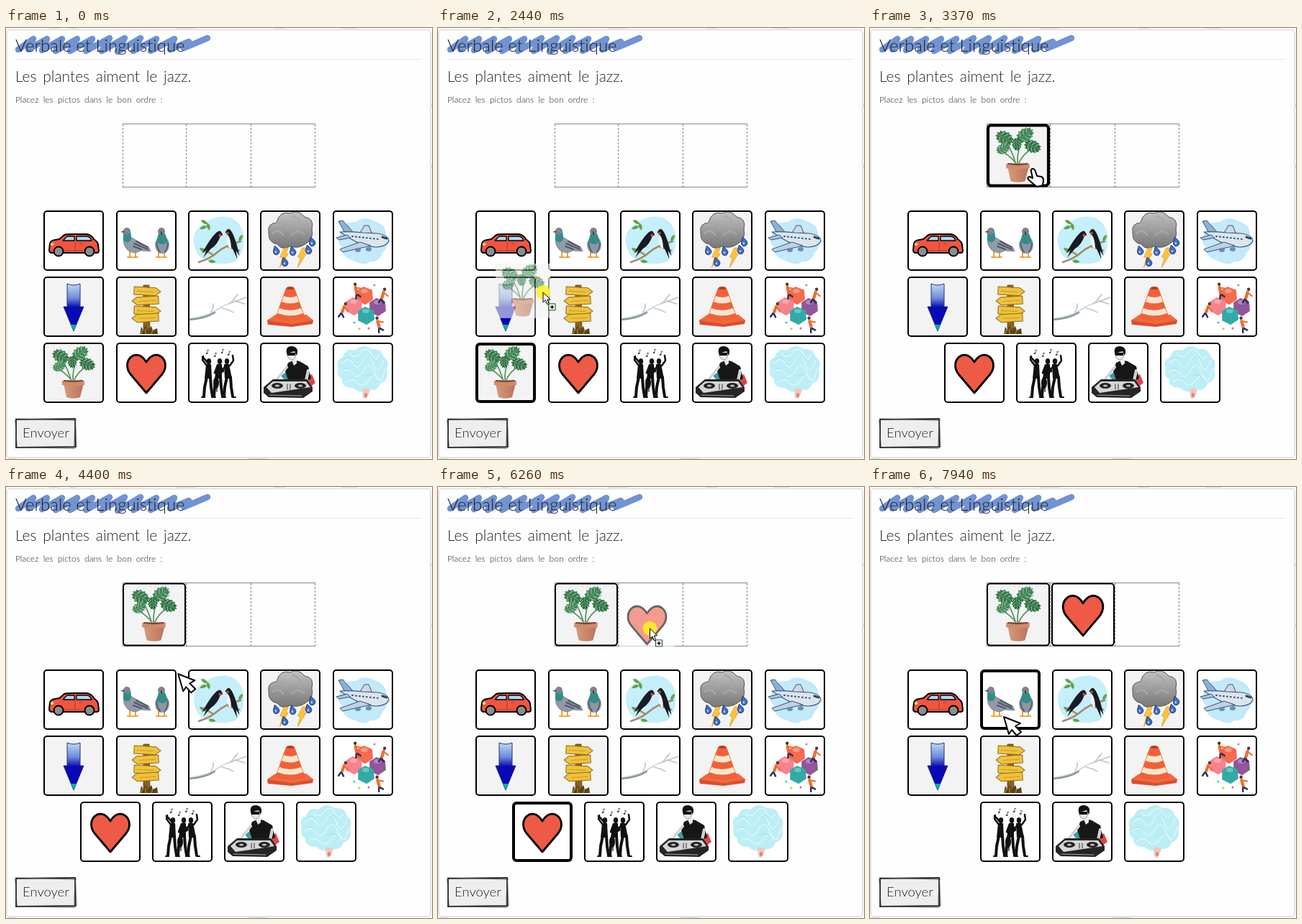
An HTML page for the animation above (8000 ms loop, 592 px wide and 600 px high).

```html
<!DOCTYPE html>
<html lang="fr">
<head>
<meta charset="utf-8">
<title>Pictos</title>
<style>
html, body { margin: 0; width: 100%; height: 100%; overflow: hidden; background: #fff; }
svg { display: block; width: 592px; height: 600px; }
text { font-family: "Architects Daughter", Lato, "Open Sans", sans-serif; font-weight: 300; font-variant-ligatures: none; fill: #222; }
</style>
</head>
<body>
<svg id="stage" viewBox="0 0 592 600" xmlns="http://www.w3.org/2000/svg">
  <defs>
    <linearGradient id="shaft" x1="0" y1="0" x2="0" y2="1"><stop offset="0" stop-color="#c4d8f4"/><stop offset=".3" stop-color="#6c8ed6"/><stop offset=".5" stop-color="#0808b4"/></linearGradient>
    <linearGradient id="cloud" x1="0" y1="0" x2="0" y2="1"><stop offset="0" stop-color="#c2c2c2"/><stop offset="1" stop-color="#777"/></linearGradient>
    <linearGradient id="pot" x1="0" x2="1"><stop offset="0" stop-color="#d99a7a"/><stop offset="1" stop-color="#b8745a"/></linearGradient>
  </defs>
  <path d="M60 .5h14M88 .5h10M236 .5h28M372 .5h16M466 .5h22M2 599.5h12M338 599.5h24M591.5 106v5M591.5 190v5" stroke="#ddd" fill="none"/>
  <rect x="1" y="2.5" width="589" height="595.5" rx="4" fill="#fefefe" stroke="#dcdcdc" stroke-width="1.5"/>
  <path d="M13 43.5H578" stroke="#e8e8e8"/>
  <path d="M17 30L38 15 31 30 57 15 50 31 78 15 69 32 99 15 89 32 120 15 111 32 144 14 133 32 165 14 155 33 187 14 177 32 209 15 201 32 234 15 228 30 254 19 247 28 280 14" fill="none" stroke="#7093d3" stroke-width="8.5" stroke-linecap="round" stroke-linejoin="round"/>
  <text x="13" y="33" font-size="24">Verbale et Linguistique</text>
  <text x="13" y="75" font-size="21" word-spacing="3">Les plantes aiment le jazz.</text>
  <text x="13" y="104" font-size="12" word-spacing="3">Placez les pictos dans le bon ordre :</text>
  <path d="M162 133.5H430M162 221.5H430" stroke="#888" stroke-width="1.2"/>
  <path d="M162.5 134V221M250.5 134V221M340.5 134V221M429.5 134V221" stroke="#888" stroke-dasharray="3 2"/>
  <path d="M14 545L96 544 97 583 14 584Z" fill="#eee" stroke="#333" stroke-width="2"/>
  <path d="M13 544L98 546M15 584L96 585M96 545L95 584M13 546L15 583" stroke="#444" stroke-width="1.2"/>
  <text x="23" y="569.5" font-size="18.5">Envoyer</text>
  <g id="cards"></g>
  <g id="ghost" opacity=".6"></g>
  <circle id="halo" r="10" fill="#fff21f" opacity=".85"/>
  <g id="pointer" stroke="#000" fill="#fff" stroke-width="2" stroke-linejoin="round">
    <path id="pointer-arrow" d="M0 0L23 9 16 13 24 21 18 26 11 18 7 24Z"/>
    <path id="pointer-hand" d="M-3 3Q-4 -1 -1 -1 2 -1 3 3L5 9 11 10Q14 11 14 15L13 22 5 24 0 20 -7 14Q-9 10 -5 10L-1 12Z"/>
    <g id="pointer-carry" stroke-width="1"><path d="M0 0V14L3.500 11 6 17 8 16 6 10 10 10Z"/><path d="M3 14l8 6" stroke-dasharray="1 1"/><path d="M8 16h9v9h-9z" stroke="#174d17"/><path d="M12.500 18v5M10 20.500h5" stroke-width="1.500"/></g>
  </g>
</svg>
<script>
const $ = id => document.getElementById(id);
const path = (d, fill, more = '') => `<path d="${d}" fill="${fill}" ${more}/>`;
const line = (d, color, w = 1) => path(d, 'none', `stroke="${color}" stroke-width="${w}" stroke-linecap="round" stroke-linejoin="round"`);
const oval = (x, y, rx, ry, fill, more = '') => `<ellipse cx="${x}" cy="${y}" rx="${rx}" ry="${ry}" fill="${fill}" ${more}/>`;
const at = (x, y, body, turn = 0, scale = 1) => `<g transform="translate(${x} ${y}) rotate(${turn}) scale(${scale})">${body}</g>`;
const each = (list, draw) => list.map(p => draw(...p)).join('');
const ink = (w = 1, c = '#000') => `stroke="${c}" stroke-width="${w}" stroke-linejoin="round"`;

function leaf(x, y, size, turn, color) {
  let d = '';
  for (let i = 0; i < 26; i++) {
    const a = i / 26 * 2 * Math.PI, r = size * (i % 2 ? .8 : 1);
    d += `${i ? 'L' : 'M'}${(r * Math.cos(a)).toFixed(1)} ${(r * .74 * Math.sin(a)).toFixed(1)}`;
  }
  const slits = [-.5, -.1, .3].map(k => {
    const sx = k * size, sy = size * .55;
    return `M${sx} 2L${sx + 3} ${sy}M${sx} -2L${sx + 3} ${-sy}`;
  }).join('');
  return at(x, y, path(d + 'Z', color) + line(slits, '#b9d3be', .9) + line(`M${-size * .8} 0H${size * .8}`, '#6fae78', .8), turn);
}

const pigeonFeet = x => line(`M${x} 15v7m-3 1h6`, '#f2a02c', 2);
const swallow = path('M-4-15Q-1-21 4-17L7-15 4-13Q7 0 0 10L-4 25-5 13-9 21Q-9-5-4-15Z', '#161b26') + oval(3, -13, 2.5, 2, '#d8402f');
const drop = (x, y) => at(x, y, path('M0-7Q6 1 5 4 3 8 0 8-4 8-5 4-5 0 0-7Z', '#416fc4', ink(1, '#17336f')) + oval(-1, 3, 1.500, 2, '#a8caf5'), -15, .85);
const bolt = (x, y) => at(x, y, path('M2-13L8-13 4-4 8-4-5 17-1 1-5 1Z', '#fbc53a', ink(.8, '#e98b1d')), 0, .9);
const sign = (y, dir) => at(0, y, path('M-17-5H13L20 0 13 6H-17Z', '#f0c23a', ink(1, '#8d6b1d')) + line('M-13 1H10', '#c99a28'), dir * 3, `${dir} 1`);
const worker = (x, y, turn) => at(x, y,
  line('M0-2L-2 6-5 13M-2 6L3 12', '#283453', 3) + line('M0-5L-1 4', '#f36b2d', 5) + line('M1-4L8 0', '#f36b2d', 2.5) + oval(1, -10, 2.600, 2.600, '#50342e'), turn, .85);
const block = (x, y, c) => at(x, y, path('M-9-5L-1-10 9-6 10 5 1 11-9 6Z', c) + oval(0, -5, 4, 2.500, '#fff', 'opacity=".3"'), 0, 1.2);
const player = (x, lean, arms) => at(x, 0,
  oval(lean, -16, 3.200, 4, '#111') + path(`M${lean - 4}-12L${lean + 3}-12 5 8-5 8Z`, '#111')
  + line('M-2 6L-5 20-6 33M3 6L4 20 6 33', '#111', 4) + line('M-9 34h4M6 34h4', '#111', 2) + line(arms, '#111', 2.5));

const art = {
  car: path('M-34 13L-33 4Q-32 0-26-1L-20-2-13-8Q-10-9 0-9H18Q25-8 28-2 34 2 34 6L35 14Q35 17 32 17H-30Q-34 17-34 13Z', '#f05540', ink(2))
    + path('M-15 0L-9-6H1V0ZM4-6H18Q23-6 25 0H4Z', '#a3ddf5', ink(1.300))
    + line('M2 1V13M-12 14H13M8 4h4', '#a93a2c') + oval(-30, 5, 2.500, 2, '#ffd35a')
    + each([[-21], [22]], x => oval(x, 15, 6.500, 6.500, '#8d8d8d', ink(2))),
  pigeons: pigeonFeet(-23) + pigeonFeet(-15) + pigeonFeet(17) + pigeonFeet(25)
    + path('M-31-8Q-24-8-20-4L4 10 6 15-8 14Q-17 20-26 13-34 6-31-8Z', '#939aa8', ink(.6, '#646b78'))
    + path('M-32-12H-22Q-20-5-22 0-28 5-32-1Z', '#318d88') + oval(-27, -13, 5, 5, '#788395') + path('M-31-14l-5 2 5 1Z', '#444')
    + line('M-17 4L2 12M-14 1L2 9M-18 8L-7 12', '#505867', 2)
    + oval(22, 6, 10, 12, '#8f96a5') + path('M17-10H26L30 1Q22 9 14 1Z', '#318d88') + oval(21, -13, 5, 5, '#788395') + line('M21-12v3', '#444', 2) + line('M14 3Q16 13 19 16M30 3Q29 12 26 16', '#596273', 2)
    + each([[-28], [19], [23]], x => oval(x, -14, .9, .9, '#e67833')),
  swallows: path('M-34 3Q-36-15-18-25 0-38 19-31 36-22 35-2 37 14 24 29 5 36-12 29-31 25-34 3Z', '#c4effb')
    + line('M-27 30Q-11 25-1 16T31 1M-7 20L-20 12M14 9L29 14', '#a58a68', 2.5)
    + each([[-20, -26, 30], [-21, -18, -20], [-14, -20, 75], [-22, 13, 35], [-9, 29, 10], [31, -3, -60]], (x, y, r) => at(x, y, path('M-5 0Q0-5 6 0 0 4-5 0Z', '#63a342'), r))
    + at(-6, 3, swallow, 28, '.85 1') + at(18, 2, swallow + oval(4, -1, 3, 10, '#f4f4f4'), -12, '-.8 1'),
  storm: path('M-30-12Q-32-24-19-25-15-42 0-38 11-44 20-33 34-31 30-16 33-2 22 4 12 12 0 8-12 14-18 5-31 3-30-12Z', 'url(#cloud)', ink(1, '#555'))
    + line('M-19-24Q-7-27-5-17M3-34Q16-31 13-20M-24-11Q-16-17-10-8M2-8Q10-17 19-9', '#a7a7a7', 2.5)
    + bolt(-10, 22) + bolt(15, 22) + each([[-20, 13], [3, 14], [25, 12], [-8, 29], [30, 1]], drop),
  plane: path('M-30 8Q-39-1-29-13-27-27-10-26 2-35 16-27 33-22 32-7 38 8 27 17 24 30 10 29 2 36-10 29-29 25-30 8Z', '#c3e9fa')
    + path('M-4-11L2-21 8-21 13-9Z', '#cad9e7', ink(1, '#385572'))
    + path('M-25-11L-34-27-28-28-13-11Z', '#85b3df', ink(1, '#385572'))
    + path('M-32-12Q-20-13 0-11L20-10Q35-8 36 0 34 8 18 9 0 8-16-2Z', '#dce5ee', ink(1.200, '#405973'))
    + path('M-4 2L-32 12-28 16 11 7Z', '#bdd2e6', ink(1, '#385572')) + path('M-22-8L-37-4-33-1-17-4Z', '#a9c6e3', ink(1, '#385572'))
    + line('M-15-6L22-2', '#335779', 2).replace('/>', ' stroke-dasharray="1 4"/>') + line('M27-5l6 2', '#2b4a69', 3) + oval(-7, 13, 4, 3, '#6c8dac') + oval(8, 12, 4, 3, '#6c8dac'),
  arrow: path('M-9-32Q0-28 9-32V0H14L0 34-14 0H-9Z', 'url(#shaft)', ink(1, '#223183')) + path('M-4 25H4L0 34Z', '#18a4a7'),
  sign: path('M-4-30H4L5 32H-4Z', '#8b6228', ink(.7, '#4f3516')) + sign(-22, 1) + sign(-9, -1) + sign(5, 1) + sign(15, -1)
    + path('M-9 38L-7 28-4 33-1 26 2 33 7 27 9 33 15 30 16 38Z', '#5f4218') + line('M-8 38l3-6M-1 38v-7M7 38l2-6', '#c0a153'),
  branch: line('M-39 17Q-17 14-5 6T17-5L39-13M-11 9Q-6 1-7-4M5 2Q15 4 21 8M17-5L27-17M23-8L37-4', '#b9c3c7', 1.5)
    + line('M-39 18Q-17 16-5 8', '#8c979b', 2.5) + line('M-37 15Q-14 12-3 4L18-7', '#e3eaed', 1),
  cone: path('M-32 19L-20 11 22 11 32 19 31 24 2 28-31 25Z', '#db4e2c') + path('M-32 19L-20 11H22L32 19 2 24Z', '#f2693d')
    + path('M-6-26Q0-29 6-26L21 16Q0 23-21 16Z', '#ef6239') + path('M-9-15Q0-11 9-15L12-7Q0-2-12-7ZM-15 2Q0 8 15 2L18 9Q0 16-18 9Z', '#fae5d0') + oval(0, -26, 5, 2, '#a94127'),
  team: block(2, -16, '#f36b50') + block(-13, -1, '#f5838f') + block(20, 0, '#92549d') + block(4, 12, '#32aaa7')
    + worker(-27, 4, 14) + worker(-9, -23, -18) + worker(28, -16, 9) + worker(22, 24, -22)
    + each([[-12, 22, '#48b9dc'], [-5, 31, '#f6b53c'], [8, 30, '#e36193'], [16, -30, '#5eb1dd']], (x, y, c) => oval(x, y, 1.600, 1.600, c)),
  plant: line('M-3 12Q-8-6-17-20M-1 12Q-2-9 8-27M0 12Q5-1 18-9M-2 12Q-8 3-19-4', '#5a9463', 1.700)
    + leaf(-18, -23, 13, 28, '#34794a') + leaf(9, -27, 13, -35, '#3f8554') + leaf(19, -12, 12, 22, '#2e7046') + leaf(-20, -9, 10, -25, '#43895a') + leaf(-2, -15, 9, 85, '#2c6b42')
    + path('M-14 15H14L9 34Q0 37-10 34Z', 'url(#pot)') + path('M-16 11Q0 9 15 11V17Q0 19-16 17Z', '#d08b6c') + line('M-13 11Q0 13 12 11', '#6b4939', 2),
  heart: path('M0 28L-22 2C-36-16-14-38 0-15 14-38 36-16 22 2Z', '#ee5a46', ink(2.800)),
  band: player(-14, 1, 'M-2-10L-8-18-7-23M3-9L-4-18-8-22') + player(0, 2, 'M-2-8L-5 0 3 3M4-8L7-2') + player(14, -2, 'M-5-9L-9-1M2-10L7-17 6-24')
    + oval(-3, 14, 4, 8, '#111') + line('M-2 26V-10', '#111', 1.300) + line('M12-13Q8-4 12 2L16-2', '#111', 2)
    + each([[-15, -31], [-4, -27], [6, -32], [15, -29]], (x, y) => line(`M${x} ${y + 4}v-5l2 1`, '#333', .8) + oval(x - 1, y + 4, 1.300, 1, '#333')),
  dj: path('M18 9L30 2 35 14 27 20Z', '#dd4650') + path('M-13 4L-6-1 0 8-7 11Z', '#3c9e9d')
    + path('M-3-14Q5-19 13-16L25-9 29 8 18 13H-2L-7-2Z', '#171717') + line('M-5-8L-13 2-21 12M25-3L22 11 12 16', '#e6e6e6', 4) + line('M-5-8L-13 2-21 12M25-3L22 11 12 16', '#999', .7)
    + path('M1-20L9-20 9-13 5-10Z', '#eee') + oval(2, -26, 6, 8, '#e9e9e9', ink(.6, '#666')) + path('M-5-27Q-7-38 3-37 13-35 9-24L6-30Z', '#111') + path('M-5-28H7V-24H-4Z', '#111')
    + path('M-37 20L-24 9H23L31 20V26L18 35-30 34-37 28Z', '#252525') + path('M-33 20L-24 12H22L28 20-26 28Z', '#d6d6d6')
    + each([[-18], [14]], x => oval(x, 18, 8, 4, '#222') + oval(x, 18, 3, 1.500, '#bbb')) + line('M-29 31L16 32', '#aaa') + line('M-4 16v7M0 16v7', '#333'),
  brain: path('M-34-6Q-39-17-28-22-24-35-11-31 0-42 11-33 25-35 29-22 38-15 33-5 37 10 24 15 20 27 7 23-2 31-14 21-30 21-29 9-37 5-34-6Z', '#bdeef6')
    + line('M-29-13Q-20-24-14-13T0-17 14-13 29-18M-31 0Q-21-9-14 1T1-4 17 2 31-5M-24 13Q-15 6-8 14T8 10 23 11M-18-27Q-11-18-3-28T12-26 22-24', '#dcf8fc', 1.300)
    + line('M-27-18Q-21-26-15-17M-28-4Q-22-11-17-3M4-20Q10-27 16-18M4 5Q11-1 16 7', '#93d9e5', .7)
    + path('M-1 23Q4 19 10 24L6 34Q3 38 0 34Z', '#f0c8bd') + oval(4, 31, 2, 3, '#df856f')
};

const GAP = 100.3, SIZE = 84;
const names = Object.keys(art);
const grey = ['storm', 'arrow', 'sign', 'cone', 'plant'];
const shade = name => grey.includes(name) ? '#f3f3f3' : '#fff';
$('cards').innerHTML = names.map(n =>
  `<g id="card-${n}"><rect rx="4" stroke="#000" fill="${shade(n)}"/>${art[n]}</g>`).join('');

const drags = [
  { name: 'plant', from: 1970, to: 3160, slot: 206, grab: [28, 2] },
  { name: 'heart', from: 5650, to: 6390, slot: 296, grab: [4, 6] }
];
const route = [
  [780, 270, 615], [1270, 186, 551], [1800, 122, 484], [2100, 122, 482], [2440, 146, 368],
  [3000, 222, 205], [3370, 227, 197], [4140, 230, 200], [4700, 250, 330], [5450, 195, 480],
  [5580, 149, 486], [5720, 149, 486], [6300, 300, 186], [6500, 300, 190], [6880, 190, 405],
  [7020, 163, 434], [7250, 165, 450], [7930, 186, 320]
];

function pointerAt(t) {
  const i = route.findIndex(k => k[0] > t);
  if (i < 1) return (i ? route[route.length - 1] : route[0]).slice(1);
  const a = route[i - 1], b = route[i], u = (t - a[0]) / (b[0] - a[0]), e = u * u * (3 - 2 * u);
  return [a[1] + (b[1] - a[1]) * e, a[2] + (b[2] - a[2]) * e];
}

function layout(t) {
  const placed = drags.filter(d => t >= d.to);
  const last = names.slice(10).filter(n => !placed.some(d => d.name === n));
  const spots = {};
  [names.slice(0, 5), names.slice(5, 10), last].forEach((row, r) => row.forEach((n, i) => {
    spots[n] = { x: Math.round(295 + (i - (row.length - 1) / 2) * GAP), y: 296 + 92 * r, s: 1 };
  }));
  placed.forEach(d => { spots[d.name] = { x: d.slot, y: 177.5, s: 1.05 }; });
  return spots;
}

function hovered(t) {
  const [x, y] = pointerAt(t), spots = layout(t);
  return names.find(n => Math.max(Math.abs(x - spots[n].x), Math.abs(y + 8 - spots[n].y)) < 43 * spots[n].s);
}

const show = (id, on) => $(id).setAttribute('display', on ? 'inline' : 'none');
const move = (id, x, y, s = 1) => $(id).setAttribute('transform', `translate(${x} ${y}) scale(${s})`);

function render(ms) {
  const t = Math.floor((ms - 80) / 130.5) * 130.5 + 100;
  const [x, y] = pointerAt(t), spots = layout(t);
  const drag = drags.find(d => t >= d.from && t < d.to);
  const hot = drag ? drag.name : hovered(t);
  for (const n of names) {
    const { x: cx, y: cy, s } = spots[n], w = n === hot ? 4 : 2, side = SIZE - w;
    move(`card-${n}`, cx, cy, s);
    const rect = $(`card-${n}`).firstChild;
    Object.entries({ x: -side / 2, y: -side / 2, width: side, height: side, 'stroke-width': w })
      .forEach(([k, v]) => rect.setAttribute(k, v));
  }
  show('ghost', drag);
  show('halo', drag);
  if (drag) {
    if ($('ghost').dataset.name !== drag.name) {
      $('ghost').dataset.name = drag.name;
      $('ghost').innerHTML = `<rect x="-38" y="-38" width="76" height="76" fill="${shade(drag.name)}"/>${art[drag.name]}`;
    }
    move('ghost', x - drag.grab[0], y - drag.grab[1]);
    move('halo', x, y);
  }
  // The cursor shape lags one step behind the hover outline.
  const hand = !drag && hovered(t - 130.5);
  show('pointer-arrow', !drag && !hand);
  show('pointer-hand', hand);
  show('pointer-carry', drag);
  move('pointer', x, y);
}

const start = performance.now();
function tick() {
  render((performance.now() - start) % 8000);
  requestAnimationFrame(tick);
}
render(0);
requestAnimationFrame(tick);
</script>
</body>
</html>
```
